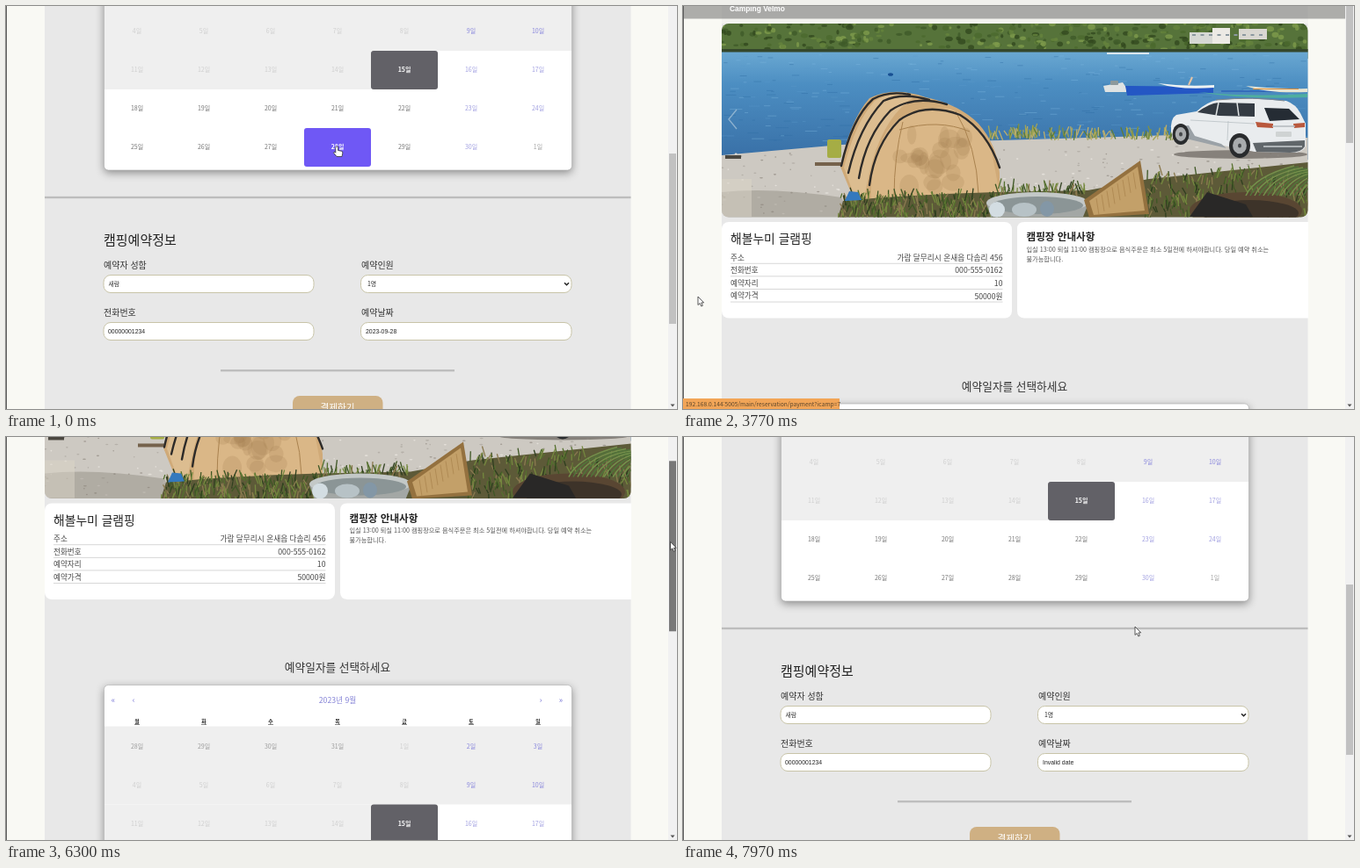
An HTML page that plays this animation: 763 by 459 pixels, repeating every 8000 ms.

```html
<!DOCTYPE html>
<html lang="ko">
<head>
<meta charset="utf-8">
<title>캠핑 예약</title>
<style>
html, body { margin: 0; width: 100%; height: 100%; overflow: hidden; background: #f9f9f4; }
svg { display: block; width: 763px; height: 459px; }
text { font-family: "Noto Sans CJK KR", "Noto Sans CJK", "Noto Sans", sans-serif; white-space: pre; }
text.a { font-family: "Liberation Sans", Arial, sans-serif; }
.sh { filter: drop-shadow(0 3px 5px rgba(0,0,0,.38)); }
</style>
</head>
<body>
<svg id="stage" viewBox="0 0 763 459"></svg>
<script>
const stage = document.getElementById('stage');

let seed = 7;
const rnd = (a = 0, b = 1) => {
  seed = (seed * 16807) % 2147483647;
  return +(a + (b - a) * seed / 2147483647).toFixed(2);
};
const pick = list => list[Math.floor(rnd(0, list.length - .01))];
const many = (n, f) => Array.from({ length: n }, (_, i) => f(i)).join('');
const rect = (x, y, w, h, fill, r = 0, more = '') =>
  `<rect x="${x}" y="${y}" width="${w}" height="${h}" rx="${r}" fill="${fill}" ${more}/>`;
const shape = (d, fill, more = '') => `<path d="${d}" fill="${fill}" ${more}/>`;
const line = (d, color, w = 1, more = '') =>
  `<path d="${d}" fill="none" stroke="${color}" stroke-width="${w}" ${more}/>`;
const oval = (x, y, rx, ry, fill, more = '') =>
  `<ellipse cx="${x}" cy="${y}" rx="${rx}" ry="${ry}" fill="${fill}" ${more}/>`;
// cy is the vertical middle of the glyphs
const text = (x, cy, size, s, fill = '#444', anchor = 'start', more = '') =>
  `<text x="${x}" y="${(cy + size * .37).toFixed(2)}" font-size="${size}" fill="${fill}" text-anchor="${anchor}" ${more}>${s}</text>`;
const grad = (id, ...stops) =>
  `<linearGradient id="${id}" x2="0" y2="1">${stops.map(([o, c]) => `<stop offset="${o}" stop-color="${c}"/>`).join('')}</linearGradient>`;
const clip = (id, x, y, w, h, r) => `<clipPath id="${id}">${rect(x, y, w, h, '#000', r)}</clipPath>`;

const CAMP = '해볼누미 글램핑', ADDRESS = '가람 달무리시 온새읍 다솜리 456', TEL = '000-555-0162';

const topBar = () => rect(0, 0, 753, 14.5, '#949492', 0, 'opacity=".75"') +
  text(53, 3, 8.4, 'Camping Velmo', '#fff', 'start', 'class="a" font-weight="bold"');

const field = (x, y, w, h) => rect(x, y, w, h, '#fff', 8, 'stroke="#c8c4a8" stroke-width="1"');
const chevron = (x, y) => line(`M${x - 2.5} ${y - 1.2}l2.5 2.5l2.5 -2.5`, '#222', 1.5);

/* ---------- booking page ---------- */

function shoreline() {
  const leaves = many(330, () => oval(rnd(44, 710), rnd(19, 49), rnd(1.5, 4.5), rnd(1.2, 3.2),
    pick(['#3f5a28', '#4c6a2e', '#66843c', '#7f9c4c', '#33491f']), 'opacity=".8"'));
  const waves = many(330, () => {
    const y = rnd(55, 156);
    return line(`M${rnd(44, 706)} ${y}h${rnd(3, 6 + (y - 50) / 8)}`, pick(['#7db6de', '#2f6ca3', '#5b9acb']), .8, 'opacity=".5"');
  });
  const stones = many(260, () => oval(rnd(44, 710), rnd(160, 238), rnd(.7, 2.2), .8,
    pick(['#b5b0a9', '#e4e0da', '#a39d95'])));
  return rect(44, 20, 667, 40, '#56733a') + leaves +
    rect(576, 30, 26, 13, '#d6d8d4') + rect(602, 25, 20, 18, '#eceae5') + rect(632, 26, 32, 12, '#d9d7d1') +
    many(9, i => rect(579 + i * 9.5, 32, 4, 2, '#8b98a0')) +
    rect(44, 52, 667, 123, 'url(#water)') + rect(44, 49, 667, 3.5, '#35472b') + waves +
    line('M482 54h48', '#dbe7ee', 2) + oval(236, 78, 3, 1.8, '#174f92') +
    shape('M478 91l22 -4 4 6v5h-24z', '#dfe3e2') + rect(486, 85, 9, 5, '#8d9a9c', 1) +
    shape('M503 91l100 1v7l-98 3z', '#2457c4') +
    shape('M540 88q30 4 64 2v3q-40 3 -64 -5z', '#eef2f2') + line('M575 90l4 -9', '#e5c3a5', 2) +
    shape('M586 98q60 6 124 2v4q-70 3 -124 -6z', '#4fae9f') + line('M612 97h90', '#2c62b8', 1.6) +
    shape('M640 91q35 4 70 3v4q-45 2 -70 -7z', '#e8e5d2') + line('M648 94.500h52', '#d78b3a', 1.2) +
    shape('M44 170L180 158L360 153L556 147L711 150V245H44z', '#cdc9c2') + stones;
}

function tent() {
  const pole = d => line(d, '#2d2b29', 2.4, 'stroke-linecap="round"');
  return shape('M179 183Q190 130 212 105Q240 91 276 104Q314 112 336 134Q357 158 360 190V214Q280 223 194 220z', '#d0aa78') +
    shape('M183 184Q196 132 218 108Q240 96 262 104Q226 128 212 190L206 218L194 214z', '#dcbd90') +
    shape('M214 219Q212 180 232 142Q258 112 304 117Q334 130 350 160L360 214z', '#dab787') +
    many(26, () => oval(rnd(246, 334), rnd(146, 206), rnd(5, 13), rnd(5, 15), '#a67f52', 'opacity=".22"')) +
    line('M250 132Q240 172 240 218M310 120Q334 160 336 214M246 141Q290 128 326 143', '#a9824f', 1) +
    pole('M180 182Q192 128 216 106Q234 96 258 101') + pole('M188 190Q200 138 228 108Q250 98 280 107') +
    pole('M200 196Q208 148 236 119Q262 101 300 112') + pole('M212 204Q218 158 246 130Q275 109 315 124Q346 143 360 184');
}

function car() {
  const wheel = (x, y, rx, ry) => oval(x, y, rx, ry, '#292b2d') + oval(x, y, rx * .66, ry * .66, '#a8abad') + oval(x, y, 2, 2.5, '#44474a');
  return oval(634, 169, 76, 5, '#6f6a63', 'opacity=".75"') +
    shape('M555 143Q554 128 561 124L584 120Q596 109 608 107L640 105L686 108Q697 112 702 122L708 134V160Q704 168 690 167L650 166L620 160L576 151L557 150z', '#e9ecee') +
    shape('M558 138L575 136L582 148L612 157L618 162L576 152L558 149z', '#9ba2a7') +
    shape('M585 121Q598 111 609 110L650 111L650 126L610 125z', '#343b43') + line('M609 110l-3 15M630 110l2 15', '#dfe3e4', 1.5) +
    line('M606 107Q650 103 684 108', '#7e868b', 1) + line('M577 130L650 134M620 131l-1 22', '#b9c0c4', .8) +
    shape('M661 116L689 117L701 129L667 131z', '#252c34') + shape('M651 132l20 2v5l-18 -1z', '#b9583c') + shape('M694 134l13 -1v5l-12 1z', '#b9583c') +
    line('M670 137h26', '#b3b9bc', 1.5) + rect(674, 143, 18, 6, '#cfd3d3', 1) + shape('M648 156L707 153V160Q703 167 690 167L652 166z', '#60666a') +
    line('M660 160h44', '#c9cdcf', 1.5) + wheel(566, 146, 9.5, 12) + wheel(633, 159, 12, 14);
}

function bigPhoto() {
  const blades = (n, x0, x1, y0, y1, colors) => many(n, () =>
    line(`M${rnd(x0, x1)} ${rnd(y0, y1)}l${rnd(-5, 5)} ${rnd(-13, -5)}`, pick(colors), 1.3));
  const dry = ['#a3a556', '#7d9144', '#bcae6c', '#5f7c38'];
  const lush = ['#55702f', '#3f5725', '#75893f', '#2f3f1f', '#8b7a50'];
  return `<g clip-path="url(#big)">` + shoreline() +
    blades(110, 345, 556, 147, 153, dry) + blades(25, 375, 405, 146, 152, dry) +
    rect(164, 152, 16, 21, '#a5ad45', 2) + rect(48, 170, 18, 4, '#4a4740') + rect(150, 178, 30, 4, '#75624c') +
    shape('M44 212Q100 206 180 218L190 241H44z', '#8d877d', 'opacity=".45"') +
    shape('M44 197h34v43h-34z', '#dcd5c8', 'opacity=".5"') + tent() + car() +
    shape('M176 241L182 222Q270 214 356 212L460 210L530 197L711 178V245z', '#5d5a38') +
    blades(260, 176, 362, 218, 246, lush) + blades(60, 356, 460, 208, 220, lush) + blades(260, 525, 712, 192, 244, lush) +
    shape('M184 222l5 -11 10 1 4 9z', '#3479bd') +
    shape('M345 225H461L453 245H352z', '#a3a7a5') + oval(403, 224, 58, 12, '#c3c8c7') + oval(403, 227, 52, 10, '#8b9596') +
    oval(357, 232, 9, 9, '#d3dde2') + oval(388, 232, 14, 8, '#b7c2c6') + oval(414, 231, 8, 9, '#8397a6') +
    shape('M456 221L520 176L530 237L462 241z', '#94713f') + shape('M462 222L517 183L525 233L467 238z', '#c3a069') +
    many(8, i => line(`M${470 + i * 6} ${219 - i * 4.2}l3 19`, '#ab8650', .8)) +
    oval(640, 233, 64, 21, '#594632') + oval(645, 236, 55, 15, '#3d3329') + shape('M576 240l20 -28 44 14 8 14z', '#292827') +
    many(14, i => line(`M${640 + i * 5} 216q${10 + i} -${22 + i} 55 -${34 - i}`, i % 2 ? '#51743a' : '#73914b', 1.5)) +
    `</g>` + line('M61 118L52 129L61 140', '#d5e4ea', 1.4, 'opacity=".5"');
}

function calendar() {
  let out = rect(111.5, 453, 532, 272, '#fff', 5, 'class="sh" stroke="#aaa" stroke-width=".6"') +
    rect(112, 500, 531, 89, '#efefef') + rect(112, 589, 303, 44, '#efefef');
  [['«', 122], ['‹', 145], ['›', 608], ['»', 631]].forEach(([s, x]) => out += text(x, 470, 9, s, '#7573d4', 'middle'));
  out += text(377, 470, 8.7, '2023년 9월', '#8482d6', 'middle');
  [...'월화수목금토일'].forEach((s, i) => {
    out += text(149 + i * 76, 494, 5.8, s, '#222', 'middle', 'font-weight="bold"') + rect(146 + i * 76, 497.5, 6, .7, '#555');
  });
  out += rect(415, 589, 76, 44, '#626167', 3) + `<g id="pick">${rect(339, 677, 76, 44, '#6f58f5', 3)}</g>`;
  for (let n = 0; n < 35; n++) {
    const row = Math.floor(n / 7), col = n % 7, day = n < 4 ? 28 + n : (n - 4) % 30 + 1;
    const color = n === 18 ? '#fff' : n === 34 ? '#a2a2a2' : col > 4 ? (row < 2 ? '#8886dc' : '#a09fe0') :
      row > 2 ? '#747474' : n < 4 ? '#9b9b9b' : '#cfcfcf';
    out += text(149 + col * 76, 522.5 + row * 44, 7, day + '일', color, 'middle',
      (n === 18 ? 'font-weight="bold"' : '') + (n === 31 ? 'id="day28"' : ''));
  }
  return out;
}

function bookingPage() {
  const info = [['주소', ADDRESS], ['전화번호', TEL], ['예약자리', '10'], ['예약가격', '50000원']];
  const label = (x, y, s) => text(x, y, 10, s, '#333');
  const value = (x, y, s, id = '') => text(x, y, 6.9, s, '#222', 'start', `class="a" ${id}`);
  return rect(0, 0, 763, 459, '#f9f9f4') + `<g id="scroll">` +
    rect(44, 0, 666.5, 1054, '#e8e8e8') + rect(44, 14, 667, 6, '#f3f3ef') + bigPhoto() +
    rect(44, 246, 330, 109.5, '#fff', 8) + shape('M388 246H711V355.500H388Q380 355 380 347V254Q380 246 388 246z', '#fff') +
    text(54, 265, 13.8, CAMP, '#222', 'start', 'font-weight="500"') +
    info.map(([a, b], i) => {
      const y = 286.5 + i * 14.6;
      return text(54, y, 8.6, a) + text(363.5, y, 8.7, b, '#444', 'end') + rect(54, y + 6.3, 309.5, .9, '#d3d3d3');
    }).join('') +
    text(390.500, 263, 11.6, '캠핑장 안내사항', '#222', 'start', 'font-weight="600"') +
    text(390.500, 277, 7.2, '입실 13:00 퇴실 11:00 캠핑장으로 음식주문은 최소 5일전에 하셔야합니다. 당일 예약 취소는', '#555') +
    text(390.500, 288, 7.2, '불가능합니다.', '#555') +
    text(377, 433, 12.7, '예약일자를 선택하세요', '#333', 'middle') + calendar() +
    rect(44, 754.8, 666.5, 2.4, '#bdbdbd') + text(111, 804, 15, '캠핑예약정보', '#222') +
    label(111, 833, '예약자 성함') + label(404, 833, '예약인원') + label(111, 887, '전화번호') + label(404, 887, '예약날짜') +
    [844.5, 898.5].map(y => field(111, y, 239, 20) + field(403.500, y, 239.5, 20)).join('') +
    text(116.5, 854, 6.9, '새람', '#333') + text(411, 854, 6.9, '1명', '#222') + chevron(637.5, 854.500) +
    value(116, 908, '00000001234') + value(409, 908, '', 'id="date"') +
    rect(244, 952, 266, 2.4, '#bdbdbd') + rect(326, 982, 102.500, 26, '#cfb083', 8) +
    text(377, 995, 10.6, '결제하기', '#fff', 'middle') + topBar() + `</g>`;
}

/* ---------- list and map page ---------- */

const thumbs = [
  rect(5, 150, 103, 68, 'url(#night)') + many(30, () => oval(rnd(6, 106), rnd(152, 184), .5, .5, '#c7c8e8')) +
    shape('M5 171Q45 160 107 182V189Q50 175 5 184z', '#7474a8', 'opacity=".6"') +
    shape('M5 197L18 190L36 199L60 201L88 190L108 196V218H5z', '#252325') +
    shape('M35 210L46 198L55 210z', '#c98f4a') + shape('M54 210L68 196L81 210z', '#f0d9a6') + rect(5, 210, 103, 8, '#302a27'),
  rect(5, 255, 103, 67, '#33482e') +
    many(26, i => shape(`M${2 + i * 4.1} 294l${rnd(4, 7)} -${rnd(22, 38)}l6 38z`, i % 2 ? '#263c25' : '#496042')) +
    shape('M5 255h103v4L80 266L62 257L36 268L5 261z', '#a8b7b0') + rect(5, 295, 103, 27, '#718147') +
    rect(8, 282, 29, 22, '#dcdfda', 3) + rect(40, 277, 18, 21, '#c6ccc7', 2) + rect(64, 284, 42, 23, '#e4e5df', 4) +
    rect(12, 286, 13, 7, '#49555a') + rect(71, 288, 15, 7, '#4b575b') + oval(78, 307, 4, 4, '#303330') +
    shape('M22 306l39 -2l20 18h-65z', '#b5b0a0'),
  rect(5, 360, 103, 67, '#52664b') +
    many(14, i => rect(8 + i * 7.3, 360, rnd(1.5, 3), 40, '#354633')) + oval(40, 378, 36, 16, '#cad0aa', 'opacity=".5"') +
    rect(5, 399, 103, 28, '#a6977c') +
    shape('M9 407Q16 383 32 384Q48 390 51 408z', '#78a19d') + shape('M22 407Q25 392 34 388Q42 396 43 408z', '#c7d4ca') +
    shape('M61 405Q68 385 84 386Q100 390 105 407z', '#669cad') + shape('M76 405Q79 392 86 389Q93 396 94 406z', '#b6cccd') +
    oval(50, 415, 16, 3, '#716955') + rect(75, 409, 10, 7, '#2c597b') + rect(28, 411, 9, 6, '#dad5c6')
];

function mapArt() {
  const road = (d, w) => line(d, '#dfe2e2', w + 1.4, 'stroke-linejoin="round"') + line(d, '#fff', w, 'stroke-linejoin="round"');
  const blocks = [[543, 144, 15, 12, 40], [488, 128, 8, 9, 30], [573, 148, 9, 5, -40], [505, 178, 9, 18, 25], [490, 205, 12, 16, 20],
    [521, 171, 25, 7, -25], [561, 190, 13, 18, 20], [605, 178, 17, 26, 25], [299, 241, 16, 7, -30], [691, 172, 14, 22, 15],
    [709, 282, 17, 10, 20], [519, 375, 11, 7, -25], [552, 388, 20, 14, 25], [520, 423, 10, 12, 35], [442, 414, 8, 9, 0],
    [671, 403, 15, 9, 25], [704, 402, 19, 12, 10], [731, 409, 14, 7, -10], [693, 438, 23, 11, 15], [640, 427, 16, 9, -25]];
  const tag = (x, y, s, turn = 0, fill = '#777', size = 5.8) =>
    text(x, y, size, s, fill, 'middle', `transform="rotate(${turn} ${x} ${y})" stroke="#fff" stroke-width="1.4" paint-order="stroke"`);
  const stop = (x, y) => rect(x - 5, y - 5, 10, 10, '#3e7ee0', 2) + rect(x - 2.7, y - 3, 5.4, 5, '#fff', 1) + rect(x - 2, y - 2, 4, 2, '#3e7ee0');
  return `<g clip-path="url(#map)">` + rect(281, 14, 472, 445, '#eef1f0') +
    shape('M582 14H640Q635 45 640 90Q645 150 640 195Q630 250 619 292Q608 350 596 405L588 459H541Q562 390 570 330Q589 270 592 205Q602 145 598 85Q590 45 582 14z', '#d3e3c9') +
    shape('M587 14H611Q613 39 624 55Q631 67 627 105Q623 160 620 205Q613 250 606 278Q597 334 591 380L575 459H550Q567 400 574 348Q580 302 589 267Q600 225 602 180Q606 132 606 91Q590 50 587 14z', '#a9d5ef') +
    shape('M690 14H753V49Q721 38 690 14z', '#d3e3c9') + shape('M705 14H735L753 31V42Q725 33 705 14z', '#a9d5ef') +
    road('M448 59Q433 67 412 76Q396 84 402 99Q413 119 438 118Q474 120 475 136Q466 151 438 174L405 205L281 291', 10) +
    road('M405 205L480 253L554 299', 7) + road('M555 324Q603 312 630 305Q646 296 648 270L651 200L663 155', 6) +
    road('M644 281Q679 273 694 306Q715 319 733 339L753 357', 7) + road('M634 304Q620 326 614 350Q604 400 591 459', 5) +
    road('M580 14Q587 55 593 82Q594 145 579 203', 2.5) + road('M662 145Q697 139 712 108L753 84', 3) +
    blocks.map(([x, y, w, h, a]) => rect(x - w / 2, y - h / 2, w, h, '#fff', 0, `stroke="#e2e5e4" stroke-width=".7" transform="rotate(${a} ${x} ${y})"`)).join('') +
    line('M642 172Q677 109 756 35', '#e4bd4a', 12) + line('M642 172Q677 109 756 35', '#fbdc68', 10.500) +
    line('M651 155Q701 113 760 67', '#e4bd4a', 9) + line('M651 155Q701 113 760 67', '#fbdc68', 7.500) +
    shape('M461 459L607 192Q639 132 656 83L685 14H714L683 78Q657 147 639 193L487 459z', '#fdf2b4', 'stroke="#e5d594" stroke-width="1"') +
    line('M474 459L624 192Q654 133 699 14', '#f3df90', 1) +
    many(4, i => line(`M${559 + i * 6} ${289 - i * 3}l7 6`, '#fff', 2)) +
    stop(640, 180) + stop(576, 260) +
    tag(614, 207, '제2솔결교', -62, '#6d6858', 6.5) + tag(568, 290, '솔결1로', -61) + tag(602, 310, '솔결교', -18) +
    tag(309, 271, '온새들로', -34, '#999', 4.5) + tag(583, 46, '달무리로', 78, '#999', 4.5) + tag(648, 222, '온새로', 90, '#999', 4.5) + tag(617, 327, '다솜길', -70, '#999', 4.5) +
    line('M680 97l4 -5M689 103l4 -5M714 72l5 -4', '#9c8140', 1) +
    oval(350, 86, 4.2, 4.2, '#7775c8') + rect(347.800, 84.5, 4.4, 3, '#fff') +
    tag(350, 94, '은솔마루', 0, '#6664b3', 6.1) + tag(350, 101, '해온들호텔&amp;스파', 0, '#6664b3', 6.1) +
    oval(671.5, 215, 4.3, 4.3, '#e88644') + oval(671.5, 215, 1.6, 1.6, '#fff') + tag(672, 224, '다온솔찬', 0, '#b76426', 6.1) +
    oval(517.5, 237, 4, 4, '#678c3f') + tag(518, 245, '누리오브솔담', 0, '#586f36', 6.2) +
    shape('M517.5 238Q510.500 228 510.500 223.500A7 7 0 0 1 524.500 223.500Q524.500 228 517.500 238z', '#2f87df', 'stroke="#1f69b6" stroke-width=".6"') +
    oval(517.5, 223.5, 3, 3, '#fff') + oval(606.5, 454, 4, 4, '#74924b') + oval(606.5, 454, 1.4, 1.4, '#fff') +
    line('M287.500 451v3H315v-3', '#333', 1) + text(323, 453, 5.8, '50m', '#222', 'middle', 'font-weight="bold"') +
    rect(333, 450.500, 5, 5, '#333') + `</g>`;
}

function mapPage() {
  const camps = [['누람캠핑장', '하늘 도솔구 물빛동 217-36', '00-555-0147'], [CAMP, ADDRESS, TEL],
    ['포루네아일드', '가람 해온시 솔결동 352-7', '000-555-0183']];
  const list = camps.map(([name, place, tel], i) => {
    const y = 150.500 + i * 104.7;
    return `<g clip-path="url(#th${i})">${thumbs[i]}</g>` + text(112, y + 7, 10, name, '#222', 'start', 'font-weight="500"') +
      text(112, y + 21.5, 7.4, place, '#555') + text(112, y + 35, 7.5, tel, '#555') +
      text(5, y + 76.500, 7, '캠핑예약하기', '#444') + rect(0, y - 11, 270, .9, '#e2e2dc');
  }).join('');
  return rect(0, 0, 763, 459, '#f9f9f4') + topBar() + text(140.500, 33, 14.3, '캠핑장 목록', '#222', 'middle') +
    text(140.500, 55.500, 6.9, '캠핑장을 검색해보세요', '#555', 'middle') +
    rect(51.500, 62, 177, 17, '#fff', 7, 'stroke="#c4ae86"') +
    shape('M203 61.500H221Q228.500 61.500 228.500 70.500Q228.500 79.500 221 79.500H203z', '#b6925f') +
    line('M217 71.500l2.200 2.200', '#fff', 1.3) + `<circle cx="215" cy="69.500" r="2.4" fill="none" stroke="#fff" stroke-width="1.1"/>` +
    text(57, 70.500, 7.6, '캠핑장 검색', '#888') + text(140.500, 91, 6.9, '지역을 선택해주세요', '#555', 'middle') +
    rect(51.500, 97, 177, 18, '#fff', 7, 'stroke="#c4ae86"') + text(58.500, 105.500, 7.2, '전체', '#222') + chevron(223, 105.500) +
    list + rect(270, 140, 10.500, 319, '#f3f3f1') + rect(271, 149, 8, 58.500, '#c1c1c1') +
    shape('M273 146.500l2 -3l2 3z', '#777') + shape('M273 444l2 3l2 -3z', '#777') + mapArt() + rect(280.500, 14, 1, 445, '#d2d4d2');
}

stage.innerHTML = '<defs>' +
  grad('water', [0, '#6aa8d2'], [.3, '#4c8ec2'], [1, '#386fa6']) +
  grad('night', [0, '#272b56'], [.45, '#55558c'], [.7, '#8a7b98'], [.82, '#c49a72']) +
  clip('big', 44, 20, 666.5, 220.500, 8) + clip('map', 281, 14, 472, 445, 0) +
  [0, 1, 2].map(i => clip('th' + i, 5.5, 150.5 + i * 104.7, 101.5, 66.5, 4)).join('') + '</defs>' +
  `<g id="booking">${bookingPage()}</g><g id="list">${mapPage()}</g>` +
  rect(753, 0, 10, 459, '#f1f1f1') + rect(754, 0, 8, 194, '#c1c1c1', 0, 'id="thumb"') +
  rect(753, 449, 10, 10, '#f1f1f1') + shape('M755.500 453.500h5l-2.500 3z', '#555') + rect(0, 0, 1, 459, '#5c5c5c') +
  `<g id="link">${rect(0, 447, 178, 12, '#f2a557')}${text(3, 453.500, 6.7, '192.168.0.144:5005/main/reservation/payment?icamp=7', '#5b452b')}</g>` +
  `<g id="arrow">${shape('M0 0V9.500L2.200 7.500L3.800 11L5.400 10.300L3.900 6.900H6.700z', '#fff', 'stroke="#333" stroke-width=".8"')}</g>` +
  `<g id="hand">${shape('M0 0Q1.500 -.5 1.600 1V4.500L5.300 5.200Q7 5.600 6.800 7.300L6 11.500H0L-3.500 7.200Q-3.300 5.700 -1.800 6.500L-1.200 7.200V1Q-1 0 0 0z', '#fff', 'stroke="#333" stroke-width=".8"')}</g>`;

const el = Object.fromEntries([...stage.querySelectorAll('[id]')].map(e => [e.id, e]));

/* ---------- time ---------- */

const LOOP = 8000;
const scrollKeys = [[5830, 0], [6300, 170], [6900, 480], [7100, 538]];
const pointerKeys = [[0, 376, 160], [500, 376, 160], [1230, 147, 131], [1500, 147, 131], [1630, 143, 124], [2030, 143, 124],
  [2830, 20, 332], [2900, 20, 332], [3430, 17, 331], [4500, 17, 331], [5300, 747, 57], [5370, 753, 54], [5630, 756, 54],
  [7100, 755.5, 260], [7500, 665, 254], [7970, 514, 216]];

// interpolates rows of [time, ...values]
function at(keys, t, ease = u => u) {
  const i = keys.findIndex(k => k[0] > t);
  if (i === 0) return keys[0].slice(1);
  if (i < 0) return keys[keys.length - 1].slice(1);
  const a = keys[i - 1], b = keys[i], u = ease((t - a[0]) / (b[0] - a[0]));
  return a.slice(1).map((v, n) => v + (b[n + 1] - v) * u);
}
const smooth = u => u * u * (3 - 2 * u);
const show = (e, on) => e.setAttribute('visibility', on ? 'visible' : 'hidden');

function draw(t) {
  const picked = t < 500, onList = t >= 500 && t < 3630;
  const scroll = picked ? 538 : at(scrollKeys, t)[0];
  el.booking.style.display = onList ? 'none' : '';
  el.list.style.display = onList ? '' : 'none';
  el.scroll.setAttribute('transform', `translate(0 ${-scroll})`);

  show(el.pick, picked);
  el.day28.setAttribute('fill', picked ? '#fff' : '#747474');
  el.day28.setAttribute('font-weight', picked ? 'bold' : 'normal');
  el.date.textContent = picked ? '2023-09-28' : 'Invalid date';

  el.thumb.setAttribute('y', onList ? 0 : -38 + scroll * .383);
  el.thumb.setAttribute('height', onList ? 335 : 194);
  el.thumb.setAttribute('fill', t >= 5560 && t < 7180 ? '#787878' : t >= 5430 && t < 5560 ? '#a8a8a8' : '#c1c1c1');

  el.link.setAttribute('opacity', at([[2880, 0], [2960, 1], [3960, 1], [4170, 0]], t)[0]);

  // while dragging, the pointer stays on the scrollbar thumb
  const dragging = t >= 5630 && t < 7100;
  const [x, y] = dragging ? [755.5, 54 + scroll * .383] : at(pointerKeys, t, smooth);
  const hand = picked || (t >= 2780 && t < 3630);
  show(el.hand, hand);
  show(el.arrow, !hand);
  (hand ? el.hand : el.arrow).setAttribute('transform', `translate(${x.toFixed(2)} ${y.toFixed(2)})`);
}

const start = performance.now();
function tick(now) {
  draw(Math.max(0, now - start) % LOOP);
  requestAnimationFrame(tick);
}
draw(0);
requestAnimationFrame(tick);
</script>
</body>
</html>
```
